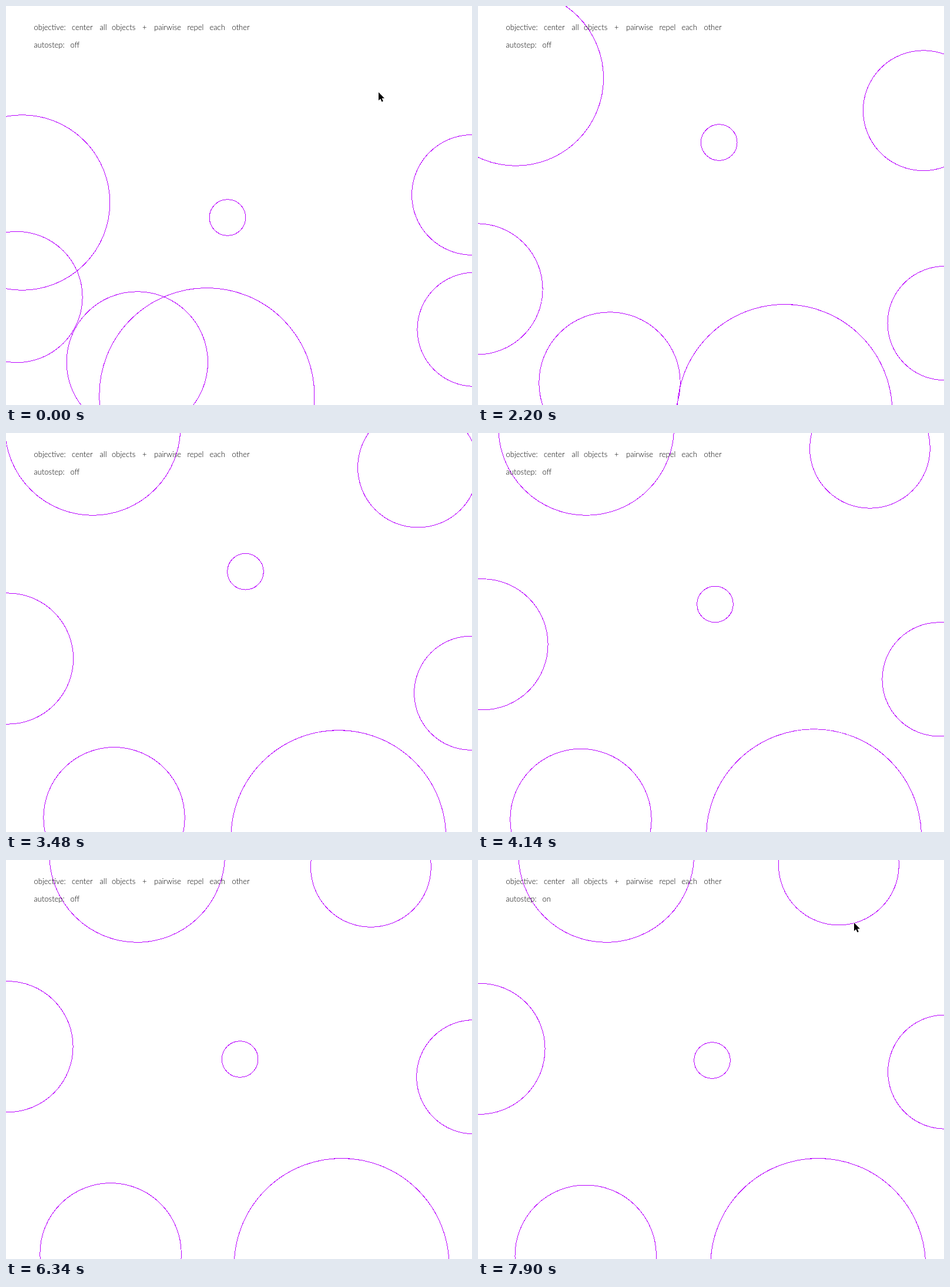
These frames come from a looping animation (793 by 680 pixels, 8000 ms). An HTML page:

```html
<!DOCTYPE html>
<html lang="en">
<head>
<meta charset="utf-8">
<title>Repelling circles</title>
<style>
  html, body { margin: 0; height: 100%; overflow: hidden; background: #fff; }
  svg { display: block; width: 793px; height: 680px; }
  #circles { fill: none; stroke: #b900ff; stroke-width: 1; shape-rendering: crispEdges; }
  text { font: 300 13px Lato, "Open Sans", sans-serif; fill: #000; }
</style>
</head>
<body>
<svg viewBox="0 0 793 680">
  <g id="circles" transform="translate(.5 .5)"></g>
  <text y="41"><tspan x="47.5">objective:</tspan> <tspan x="112">center</tspan> <tspan x="159.5">all</tspan> <tspan x="180">objects</tspan> <tspan x="232">+</tspan> <tspan x="252">pairwise</tspan> <tspan x="308.5">repel</tspan> <tspan x="346.5">each</tspan> <tspan x="384.5">other</tspan></text>
  <text y="71"><tspan x="47.5">autostep:</tspan> <tspan x="109.5" id="mode">off</tspan></text>
  <path id="cursor" d="M0 0V14L3.2 11L5.5 16.2L7.8 15.2L5.6 10.2H10Z" stroke="#fff" stroke-width="1" paint-order="stroke"/>
</svg>
<script>
const LOOP = 8000;

// Moments at which the layout advances by one step.
const stepTimes = [650, 1070, 1460, 1840, 2200, 2530, 2860, 3150, 3480, 3780, 4140,
  4490, 4820, 5240, 5570, 5920, 6340, 7540, 7660, 7780, 7900];
const AUTOSTEP_START = 7540;

// Cursor tip from each moment on; null hides it.
const cursorStops = [[0, [634, 147]], [180, [640, 152]], [300, null], [7660, [640, 107]]];

// Centres are given at these steps unless a circle has its own.
const knots = [0, 3, 7, 11, 14, 17, 21];
const circles = [
  { r: 149.3, x: [27, 35.3, 106, 183.7, 217, 222.7, 217.8],
    y: [334.5, 313.5, 212.5, 192.3, 159.3, 49, -9.5, -9.5],
    yKnots: [0, 1, 2, 3, 4, 7, 9, 21] },
  { r: 111.6, x: [18, -2, -2, 7, 1.2, 2, 2], y: [495.5, 531, 414.3, 359.8, 325, 317.7, 321.3] },
  { r: 120.2, x: [222.8, 239, 200.3, 174.5, 181.7, 177.6, 182.7], y: [606.5, 626.5, 652.3, 658, 670.3, 670.3, 673.7] },
  { r: 183, x: [341.3, 471, 552, 571, 562, 570.7, 578.2], y: [663, 691, 691, 687.3, 691, 691, 691] },
  { r: 30.8, x: [376.5, 408.5, 410.2, 403, 401.5, 397.7, 398], y: [360, 291, 196.4, 291.4, 328.7, 339, 341] },
  { r: 102.4, x: [792.5, 775.5, 733.5, 666.4, 630.3, 620.4, 613.4], y: [321.4, 247, 110.9, 25.3, 14.3, 11.4, 8] },
  { r: 97.1, x: [796.5, 789.2, 798, 784.5, 793.3, 795.3, 794.2], y: [550.7, 590.6, 471.5, 419.3, 382, 369.2, 360.6] }
];

// Monotone cubic interpolation: smooth, without overshooting the given values.
function curve(xs, ys) {
  const slopes = xs.slice(1).map((x, i) => (ys[i + 1] - ys[i]) / (x - xs[i]));
  const tangents = xs.map((_, i) => {
    if (i === 0) return slopes[0];
    if (i === xs.length - 1) return slopes[i - 1];
    const a = slopes[i - 1], b = slopes[i];
    return a * b <= 0 ? 0 : 2 * a * b / (a + b);
  });
  return x => {
    let i = 0;
    while (i < xs.length - 2 && x >= xs[i + 1]) i++;
    const h = xs[i + 1] - xs[i], u = (x - xs[i]) / h, v = 1 - u;
    return ys[i] * (1 + 2 * u) * v * v + tangents[i] * h * u * v * v
      + ys[i + 1] * u * u * (3 - 2 * u) - tangents[i + 1] * h * u * u * v;
  };
}

const layer = document.getElementById("circles");
const mode = document.getElementById("mode");
const cursor = document.getElementById("cursor");

const balls = circles.map(({ r, x, y, yKnots = knots }) => {
  const node = document.createElementNS(layer.namespaceURI, "circle");
  node.setAttribute("r", r);
  layer.append(node);
  return { node, cx: curve(knots, x), cy: curve(yKnots, y) };
});

function draw(t) {
  const step = stepTimes.filter(time => time <= t).length;
  for (const { node, cx, cy } of balls) {
    node.setAttribute("cx", cx(step));
    node.setAttribute("cy", cy(step));
  }
  mode.textContent = t < AUTOSTEP_START ? "off" : "on";

  const tip = cursorStops.filter(([time]) => time <= t).pop()[1];
  cursor.setAttribute("visibility", tip ? "visible" : "hidden");
  if (tip) cursor.setAttribute("transform", `translate(${tip})`);
}

function tick() {
  draw(performance.now() % LOOP);
  requestAnimationFrame(tick);
}
tick();
</script>
</body>
</html>
```
